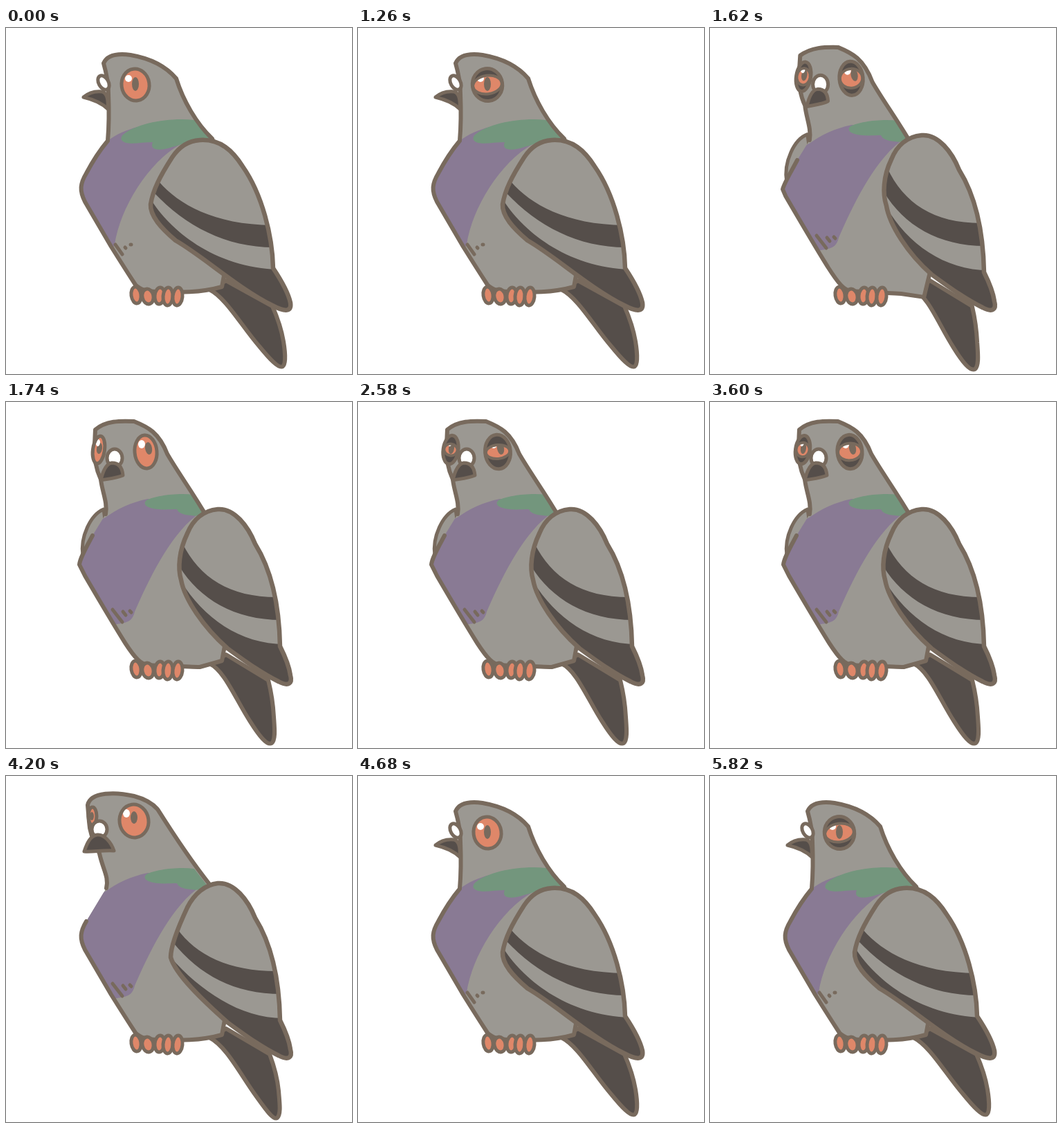
An HTML page with a canvas for the animation above (5.88 s loop, 500 by 500 pixels).

```html
<!DOCTYPE html>
<html lang="en">
<head>
<meta charset="utf-8">
<title>Pigeon</title>
<style>
html, body { margin: 0; height: 100%; overflow: hidden; background: #fff; }
canvas { display: block; width: 100vw; height: 100vh; }
</style>
</head>
<body>
<canvas id="stage" width="500" height="500"></canvas>
<script>
const ctx = document.getElementById('stage').getContext('2d');
const LOOP = 5880, STEP = 60;
const LINE = '#786a5d', GRAY = '#9b9892', DARK = '#554e4a', PURPLE = '#897a94',
      GREEN = '#73967d', ORANGE = '#df8769', WHITE = '#fff';

// Each part has three poses: side view (0), half turned (1), front view (2).
const lowerBody = ' L335 250 L312 374 C280 383 250 382 215 381 C205 380 195 379 187 371 C172 348 162 332 152 316 L114 251 C106 235 107 225 116 210 C125 193 136 176 ';
const wingEdge = 'C285 330 335 376 385 401 C404 411 413 410 411 397 C408 383 398 365 386 347 C385 300 370 240 342 200 C328 178 310 160 280 162Z';
const wingEdgeFront = 'C350 378 370 392 394 404 C409 412 414 406 411 395 C409 380 402 365 396 353 C395 300 385 245 360 205 C350 180 330 153 306 155Z';
const turnedPurple = 'M100 190 L145 166 C160 155 180 145 205 140 L260 148 L275 164 C235 195 205 260 186 303 C183 315 178 319 160 321 L100 340Z';
const turnedGreen = 'M203 142 C215 136 245 131 272 134 L292 160 C285 165 275 165 268 164 C255 163 249 160 247 155 C235 155 218 157 206 152 C200 150 199 145 203 142Z';
const turnedMarks = 'M154 300 L168 318 M169 303 L173 308 M179 302 L181 304';

const parts = {
  tail: [
    'M294 378 C318 390 340 430 366 460 C380 477 394 493 400 489 C405 485 403 465 401 453 C398 435 392 418 385 402 L318 365Z',
    'M294 378 C318 390 338 430 361 462 C374 480 386 498 392 494 C398 488 395 470 394 455 C392 435 387 418 381 402 L318 365Z',
    'M294 378 C316 388 332 430 353 462 C365 481 377 497 384 493 C390 488 388 470 387 455 C386 435 383 418 379 402 L318 365Z'],
  farWing: [
    'M143 166 C125 182 116 205 113 222 L150 220Z',
    'M143 166 C125 182 116 205 113 222 L150 220Z',
    'M141 155 C122 163 107 195 111 222 L150 220Z'],
  body: [
    'M147 163 C149 140 149 120 148 95 C148 80 145 65 141 51 C147 37 165 37 180 39 C215 45 235 60 246 73 C256 105 275 138 298 160' + lowerBody + '147 163Z',
    'M145 162 C149 146 140 135 135 112 C128 95 121 85 120 66 L118 42 C122 22 160 23 185 29 C200 33 212 40 219 48 C238 78 262 116 293 155' + lowerBody + '145 162Z',
    'M144 162 C147 145 139 130 137 112 C129 95 127 80 128 62 C129 40 144 27 165 27 C185 28 205 36 221 44 C233 75 258 118 289 154' + lowerBody + '144 162Z'],
  purple: [
    'M100 190 L147 163 C160 153 175 147 190 143 L240 150 L252 168 C205 195 165 260 157 313 C156 315 155 317 153 320 L100 340Z',
    turnedPurple, turnedPurple],
  green: [
    'M172 152 C190 138 235 129 272 133 L300 160 C270 159 258 168 240 172 C220 179 207 176 212 165 C195 165 175 170 168 163 C164 160 168 154 172 152Z',
    turnedGreen, turnedGreen],
  marks: ['M158 313 L168 327 M172 317 L173 318 M180 313 L181 313', turnedMarks, turnedMarks],
  wing: [
    'M280 162 C262 163 250 172 240 187 C222 215 212 235 209 255 C208 272 225 290 245 307 ' + wingEdge,
    'M306 155 C288 157 272 170 262 190 C248 220 238 245 238 262 C245 287 285 325 320 356 ' + wingEdgeFront,
    'M306 155 C285 157 270 170 262 190 C250 215 248 240 253 257 C258 285 285 325 320 356 ' + wingEdgeFront],
  band: [
    'M221 222 C250 255 300 284 385 285 L390 317 C320 318 260 287 214 238Z',
    'M247 220 C275 260 325 283 395 282 L398 315 C330 315 280 288 241 240Z',
    'M255 204 C280 255 325 283 395 282 L398 315 C330 315 280 285 250 237Z'],
  tip: [
    'M209 247 C235 290 300 347 395 349 L430 420 L300 400 L200 280Z',
    'M236 260 C280 310 340 352 405 350 L430 420 L300 400 L220 280Z',
    'M253 259 C285 312 340 351 405 350 L430 420 L300 400 L240 280Z'],
  beak: [
    'M112 100 C120 93 130 91 139 92 C146 94 148 104 147 117 C138 108 125 103 112 100Z',
    'M113 109 C117 97 122 86 132 85 C142 84 152 96 156 108 C140 107 125 110 113 109Z',
    'M137 113 C140 100 145 89 153 88 C163 88 168 95 169 106 C160 110 148 111 137 113Z']
};

// Ellipses: x, y, rx, ry, tilt in degrees
const cere = ['141 79 7 11 -30', '135 77 11 12 0', '157 81 11 13 0'];
const nearEye = {
  ball: ['187 82 20 23 -8', '185 65 21 24 -8', '202 72 16 24 -5'],
  pupil: ['187 81 5 10 0', '185 60 5 9 0', '206 67 5 9 -10'],
  shine: ['177 73 5 5 0', '174 54 5 6 0', '196 61 5 6 0']
};
const farEye = {
  ball: ['128 62 3 8 0', '125 58 6 13 0', '134 69 8.5 20 8'],
  pupil: ['127 62 2 5 0', '124 58 3 6 0', '135 67 4 8 8'],
  shine: ['126 58 1 2 0', '121 52 1 2 0', '133 59 3 5 8']
};
const toes = ['188 386 7 12 -8', '205 388 8 11 -12', '222 387 7 12 6', '234 388 7 13 4', '248 388 7 13 6'];

// One value per step, beginning at the given time
const sideBlink = [.57, .2, 0, .2, .57];
const slowBlink = [.57, .25, 0, 0, .25, .4, .57, .75, .9];
const blinks = [
  [60, sideBlink],
  [1260, [.57, .2, 0, 0, .1, .3, .57, .8]],
  [2280, slowBlink],
  [2880, slowBlink],
  [3480, [.5, 0, .5]],
  [4260, [.6, .2, 0, .2, .5, .75, .9]],
  [5580, sideBlink]
];
const turns = [
  [0, [0]],
  [1260, [0, 0, .3, 1.1, 1.9, 2.2, 2.12, 2.04, 2]],
  [4200, [1, .3, -.12, -.22, -.14, -.06, .03, .02, 0]]
];

function valueAt(tracks, t, hold) {
  let value = 1;
  for (const [start, list] of tracks) {
    if (t < start) continue;
    const i = Math.floor((t - start) / STEP);
    value = i < list.length ? list[i] : hold ? list[list.length - 1] : 1;
  }
  return value;
}

function mix(poses, turn) {
  const i = turn < 1 ? 0 : 1, number = /-?[\d.]+/g;
  const next = poses[i + 1].match(number);
  let k = 0;
  return poses[i].replace(number, n => +n + (next[k++] - n) * (turn - i));
}

function oval(text, grow = 0, open = 1) {
  const [x, y, rx, ry, tilt] = text.split(' ').map(Number);
  const path = new Path2D();
  path.ellipse(x, y, Math.max(0, rx + grow), Math.max(0, ry * open + grow / 3),
    tilt * Math.PI / 180, 0, 2 * Math.PI);
  return path;
}

function paint(path, fill, width = 0) {
  if (fill) {
    ctx.fillStyle = fill;
    ctx.fill(path);
  }
  if (width) {
    ctx.lineWidth = width;
    ctx.stroke(path);
  }
}

function inside(path, drawing) {
  ctx.save();
  ctx.clip(path);
  drawing();
  ctx.restore();
}

function drawEye(eye, turn, open) {
  const ball = mix(eye.ball, turn);
  const rim = oval(ball, 4 * (1 - open));
  const gap = oval(ball, 2 * (1 - open), open);
  paint(rim, open < 1 ? DARK : ORANGE);
  inside(gap, () => {
    paint(gap, ORANGE);
    paint(oval(mix(eye.pupil, turn)), LINE);
    paint(oval(mix(eye.shine, turn)), WHITE);
  });
  if (open < 1) paint(gap, null, 4);
  paint(rim, null, 5);
}

function draw(t) {
  const turn = valueAt(turns, t, true), open = valueAt(blinks, t);
  const shape = {};
  for (const name in parts) shape[name] = new Path2D(mix(parts[name], turn));

  ctx.fillStyle = WHITE;
  ctx.fillRect(0, 0, 500, 500);
  ctx.strokeStyle = LINE;
  ctx.lineCap = ctx.lineJoin = 'round';

  paint(shape.tail, DARK, 6);
  if (turn > 1) paint(shape.farWing, GRAY, 5);
  paint(shape.body, GRAY);
  inside(shape.body, () => {
    paint(shape.purple, PURPLE);
    paint(shape.green, GREEN);
    paint(shape.marks, null, 5);
  });
  paint(shape.body, null, 6);
  for (const toe of toes) paint(oval(toe), ORANGE, 5);

  paint(shape.wing, GRAY);
  inside(shape.wing, () => {
    paint(shape.band, DARK);
    paint(shape.tip, DARK);
  });
  paint(shape.wing, null, 6.5);

  if (turn > .6) drawEye(farEye, turn, open);
  drawEye(nearEye, turn, open);
  paint(oval(mix(cere, turn)), WHITE, 5);
  paint(shape.beak, DARK, 5);
}

function tick() {
  const t = performance.now() % LOOP;
  draw(Math.floor(t / STEP) * STEP);
  requestAnimationFrame(tick);
}
tick();
</script>
</body>
</html>
```
